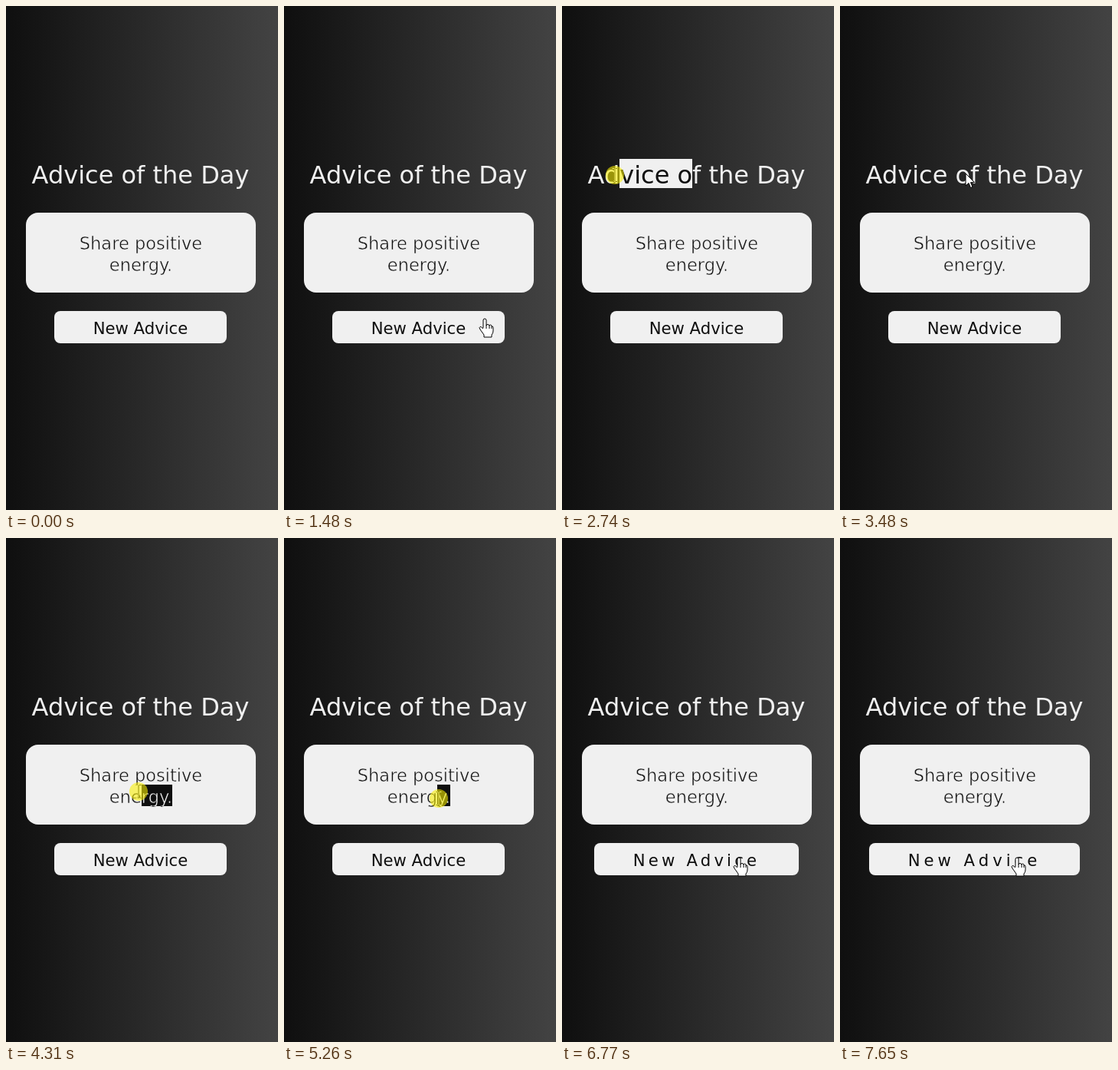
These frames come from a looping animation (355 by 656 pixels, 8 s). An HTML page:

```html
<!DOCTYPE html>
<html lang="en">
<head>
<meta charset="utf-8">
<title>Advice of the Day</title>
<style>
html, body { margin: 0; width: 100%; height: 100%; overflow: hidden; background: #0f0f0f; }
svg { display: block; width: 355px; height: 656px; }
text { font-family: "DejaVu Sans", Inter, sans-serif; text-anchor: middle; fill: #0f0f0f; }
.title { font-size: 32px; fill: #f0f0f0; }
/* the outline in the background colour thins the letters */
.advice { font-size: 22.5px; stroke: #f0f0f0; stroke-width: .6px; }
.label { font-size: 21.2px; }
.title.picked { fill: #0f0f0f; }
.advice.picked { fill: #f0f0f0; stroke: #0f0f0f; }
#beam { mix-blend-mode: difference; }
</style>
</head>
<body>
<svg viewBox="0 0 355 656">
  <defs>
    <linearGradient id="shade">
      <stop offset="0" stop-color="#0f0f0f"/>
      <stop offset="1" stop-color="#434343"/>
    </linearGradient>
  </defs>
  <rect width="355" height="656" fill="url(#shade)"/>
  <rect x="26" y="269" width="300" height="104" rx="16" fill="#f0f0f0"/>
  <text id="title" class="title" x="175.5" y="231">Advice of the Day</text>
  <text id="line1" class="advice" x="176" y="317">Share positive</text>
  <text id="line2" class="advice" x="176" y="345">energy.</text>
  <rect id="button" y="397" height="42" rx="8" fill="#f0f0f0"/>
  <text id="label" class="label" x="175.5" y="426.5">New Advice</text>
  <path id="beam" d="M-3.5-8.5H-1L0-7.5L1-8.5H3.5M0-7.5V7.5M-3.5 8.5H-1L0 7.5L1 8.5H3.5" fill="none" stroke="#fff"/>
  <path id="arrow" d="M0 0V16L4 12.5L6.5 18.5L9 17.5L6.5 11.7H11.5Z" fill="#fff" stroke="#000"/>
  <path id="hand" d="M-2 11V1Q-2-1 0-1T2 1V8Q2 6.5 4 6.5T6 8.5Q6 7 7.5 7T9 9Q11 8.5 11 10.5V15Q11 18 9 20V23H-1V20L-6 13Q-8 10-6 9.5Q-5 9-2 12M2 8V12M6 8.5V12M9 9V12" fill="#fff" stroke="#000" stroke-linejoin="round"/>
  <circle id="spot" r="12" fill="#faf000" fill-opacity=".58"/>
</svg>
<script>
const LOOP = 8000;
const $ = id => document.getElementById(id);

// Pointer moves: start, end, x, y reached
const moves = [
  [1060, 1480, 262, 408], [1480, 1970, 171, 222], [2110, 2700, 69, 220],
  [2840, 3340, 164, 218], [3560, 3930, 221, 339], [3930, 4310, 173, 330],
  [4310, 4640, 94, 299], [4740, 5260, 202, 339], [5260, 5540, 225, 361],
  [5900, 6290, 231, 414], [6290, 6500, 231, 417]
];
const titleDrag = [2050, 3340], adviceDrag = [3930, 5940], click = [7520, 7650];

const within = (v, [from, to]) => v >= from && v < to;
const clamp = v => Math.max(0, Math.min(1, v));
const ease = v => v < .5 ? 2 * v * v : 1 - 2 * (1 - v) * (1 - v);
const show = (id, on) => $(id).setAttribute("visibility", on ? "visible" : "hidden");

function make(parent, name, attrs) {
  const node = document.createElementNS("http://www.w3.org/2000/svg", name);
  for (const key in attrs) node.setAttribute(key, attrs[key]);
  return parent.appendChild(node);
}

function setSpan(node, from, to) {
  node.setAttribute("x", Math.round(from));
  node.setAttribute("width", Math.max(0, Math.round(to) - Math.round(from)));
}

// A line of text with a recoloured copy that shows through its selection
function selectable(id, y, height, color) {
  const text = $(id), copy = text.cloneNode(true);
  const clip = make(document.querySelector("defs"), "clipPath", { id: id + "Clip" });
  const hole = make(clip, "rect", { y, height });
  const layer = make(text.parentNode, "g", { "clip-path": `url(#${id}Clip)` });
  text.after(layer);
  make(layer, "rect", { y, height, width: 355, fill: color });
  copy.removeAttribute("id");
  copy.classList.add("picked");
  layer.append(copy);
  const count = text.getNumberOfChars();
  const stop = i => i < count ? text.getStartPositionOfChar(i).x : text.getEndPositionOfChar(count - 1).x;
  const stops = Array.from({ length: count + 1 }, (_, i) => stop(i));
  return {
    stops,
    end: stops[count],
    snap: x => stops.reduce((a, b) => Math.abs(b - x) < Math.abs(a - x) ? b : a),
    select: (from, to) => setSpan(hole, from, to)
  };
}

const title = selectable("title", 199, 38, "#f0f0f0");
const line1 = selectable("line1", 293, 28, "#0f0f0f");
const line2 = selectable("line2", 321, 28, "#0f0f0f");

function pointAt(t) {
  let x = 346, y = 464;
  for (const [start, end, toX, toY] of moves) {
    const p = clamp((t - start) / (end - start));
    x += (toX - x) * p;
    y += (toY - y) * p;
  }
  return [x, y];
}

function drawPointer(t, x, y) {
  const on = t >= 1060;
  const hand = on && within(y, [397, 439]) && within(x, [63, 288]);
  const overTitle = t < titleDrag[1] && within(y, [199, 237]);
  const overAdvice = within(y, [293, 349]) && within(x, [56, 296]);
  const beam = on && (overTitle || overAdvice);
  for (const id of ["beam", "arrow", "hand", "spot"])
    $(id).setAttribute("transform", `translate(${Math.round(x)} ${Math.round(y)})`);
  show("hand", hand);
  show("beam", beam);
  show("arrow", on && !hand && !beam);
  show("spot", [titleDrag, adviceDrag, click].some(span => within(t, span)));
}

function drawSelection(t, x, y) {
  const anchor = title.stops[8];
  title.select(within(t, titleDrag) ? title.snap(x) : anchor, anchor);
  const dragging = within(t, adviceDrag), upper = dragging && y < 321;
  const tail = line1.end + 7;
  line1.select(upper ? line1.snap(x) : tail, tail);
  const caret = upper ? line2.stops[0] : y < 349 ? line2.snap(x) : line2.end;
  line2.select(dragging ? caret : line2.end, line2.end);
}

function drawButton(t) {
  const p = ease(clamp((t - 6270) / 700));
  setSpan($("button"), 63 - 25 * p, 288 + 25 * p);
  $("label").style.letterSpacing = 5 * p + "px";
}

function draw(t) {
  const [x, y] = pointAt(t);
  drawPointer(t, x, y);
  drawSelection(t, x, y);
  drawButton(t);
}

function tick() {
  draw(performance.now() % LOOP);
  requestAnimationFrame(tick);
}
tick();
</script>
</body>
</html>
```
